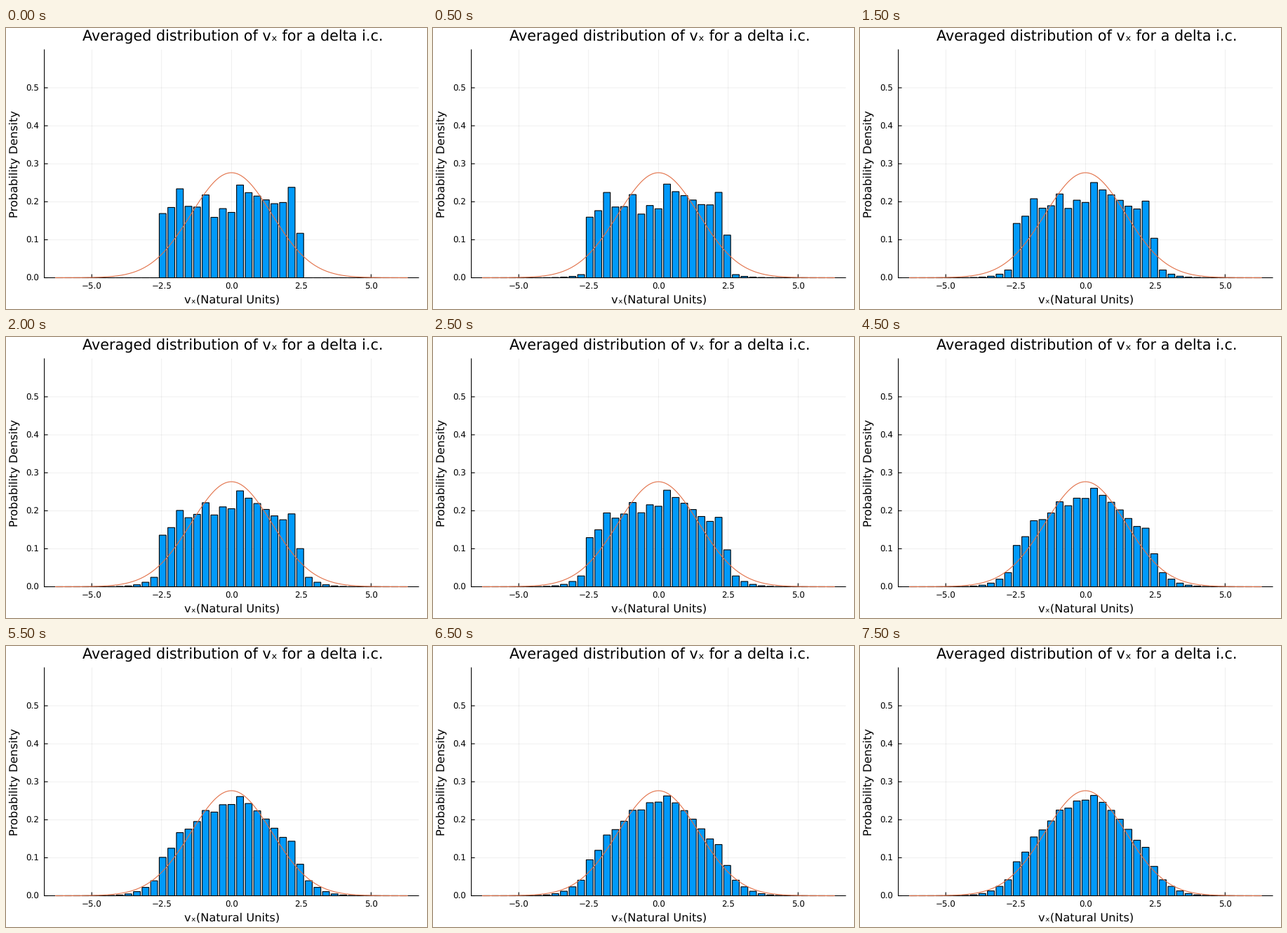
A matplotlib script that plays this animation: 600x400 px, repeating every 8 s.

```python
import numpy as np
import matplotlib.pyplot as plt
from matplotlib.animation import FuncAnimation

W, H, DPI = 600, 400, 100
LEFT, RIGHT, TOP, BASE = 54.6, 588, 31, 355.5
XMAX, YMAX = 6.7, 0.6
STEP, SIGMA = 4 / 13, 1.443
INTERVAL = 500
PX = 72 / DPI          # points per pixel
FONT = 1.482 * PX      # scale of all font sizes

plt.rcParams.update({"font.family": "DejaVu Sans", "text.hinting": "no_hinting"})

# Densities of the 17 middle bars at the start, in thousandths
START = [169, 185, 234, 188, 186, 218, 159, 182, 172,
         244, 224, 215, 205, 195, 198, 238, 117]


def bell(v):
    return np.exp(-(v / SIGMA) ** 2 / 2) / (SIGMA * np.sqrt(2 * np.pi))


k = np.arange(-20, 21)
dist = np.abs(k)
start = np.pad(np.array(START) / 1000, 12)
# Every bar relaxes to the bell with a slight shoulder; outer tails are slower
limit = bell(k * STEP) + 0.012 * np.exp(-((dist - 5) / 1.6) ** 2)
tau = np.where(dist > 8, 2.4 * 1.55 ** (dist - 9.0), 5.2)


def heights(i):
    seconds = i * INTERVAL / 1000
    return limit + (start - limit) * np.exp(-seconds / tau)


fig = plt.figure(figsize=(W / DPI, H / DPI), dpi=DPI, facecolor="white")
ax = fig.add_axes([LEFT / W, 1 - BASE / H, (RIGHT - LEFT) / W, (BASE - TOP) / H])
ax.set(xlim=(-XMAX, XMAX), ylim=(0, YMAX))
ax.axis("off")

unit_x = 2 * XMAX / (RIGHT - LEFT)
unit_y = YMAX / (BASE - TOP)
tick = 5               # tick length in pixels


def label(x, y, text, size, **kw):
    fig.text(x / W, 1 - y / H, text, fontsize=size * FONT, va="baseline", **kw)


def line(xs, ys, color="black", width=1.1, **kw):
    ax.plot(xs, ys, color=color, lw=width * PX, clip_on=False, snap=False, **kw)


def grid(xs, ys):
    line(xs, ys, width=0.6, alpha=0.1, zorder=1)


for x in np.arange(-5, 5.1, 2.5):
    grid([x, x], [0, YMAX])
    line([x, x], [0, tick * unit_y], zorder=2, solid_capstyle="butt")
    text = f"{x:.1f}".replace("-", "\u2212")
    label(LEFT + (x + XMAX) / unit_x, 371.6, text, 8, ha="center")

for y in np.arange(6) / 10:
    grid([-XMAX, XMAX], [y, y])
    line([-XMAX, -XMAX + tick * unit_x], [y, y], zorder=2, solid_capstyle="butt")
    label(47.3, BASE - y / unit_y + 4.4, f"{y:.1f}", 8, ha="right")

line([-XMAX, XMAX], [0, 0], zorder=2)
line([-XMAX, -XMAX], [0, YMAX], zorder=2)

label(322.8, 18.3, "Averaged distribution of v\u2093 for a delta i.c.", 14, ha="center")
label(321.8, 392, "v\u2093(Natural Units)", 11, ha="center")
label(16.4, 193.3, "Probability Density", 11, ha="center",
      rotation=90, rotation_mode="anchor")

bars = ax.bar(k * STEP, heights(0), 0.8 * STEP, color="#009AFA", edgecolor="black",
              linewidth=1.1 * PX, clip_on=False, snap=False, zorder=3)

v = np.linspace(-6.3, 6.3, 379)
line(v, bell(v), color="#E26F46", zorder=4)


def update(i):
    for bar, h in zip(bars, heights(i)):
        bar.set_height(h)
    return list(bars)


anim = FuncAnimation(fig, update, frames=16, interval=INTERVAL, repeat=True,
                     repeat_delay=0, blit=False)
plt.show()
```
